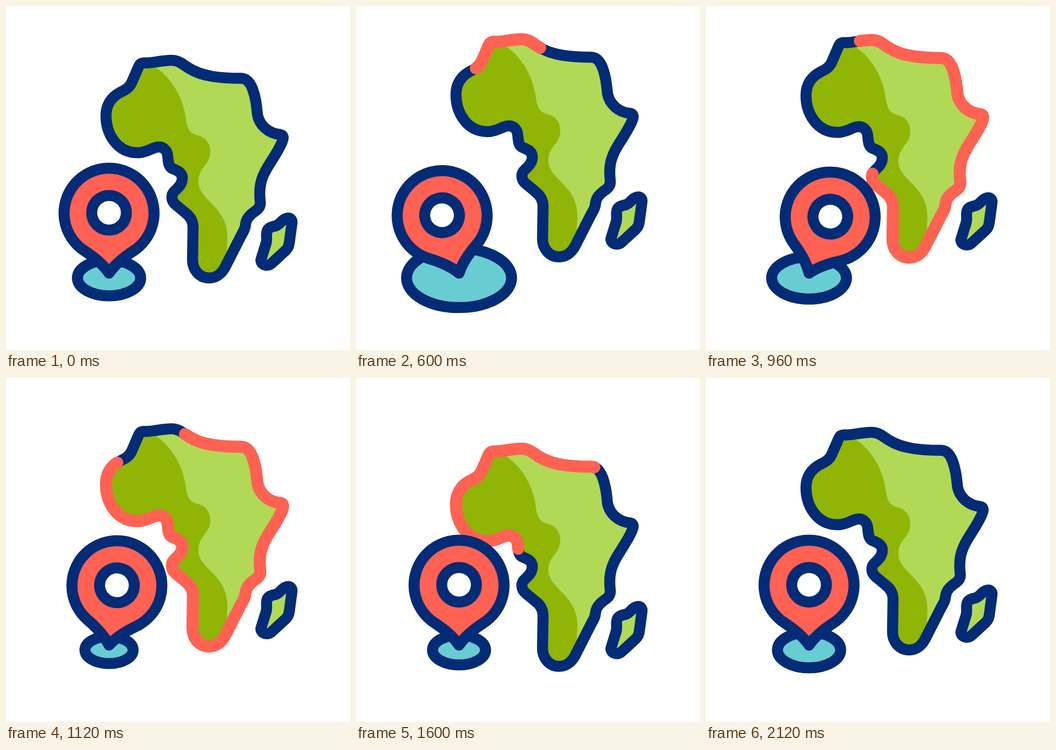
Write an HTML page that moves like this. It is 640 px wide and 640 px high and loops after 2.2 s.

```html
<!DOCTYPE html>
<html lang="en">
<head>
<meta charset="utf-8">
<title>Map pin beside a continent</title>
<style>
  html, body { margin: 0; width: 100%; height: 100%; overflow: hidden; background: #fff; }
  svg { display: block; width: 100%; height: 100%; }
  .line { stroke: #032b76; stroke-width: 20.5; stroke-linecap: round; stroke-linejoin: round; }
  .light { fill: #b1d955; }
  .dark { fill: #90b506; }
  .red { fill: #ff6252; }
  .trail { fill: none; stroke: #ff6252; stroke-width: 22.5; stroke-linecap: round; stroke-linejoin: round; }
</style>
</head>
<body>
<svg viewBox="0 0 640 640">
  <defs>
    <path id="coast" pathLength="1" d="M247.5 111
      C250 106 255 105.5 260 106 C275 106 290 101 308 101 C322 101 330 109.5 340 115.5
      C365 131.5 400 134.5 437 134.5 C448 134.5 454 142 459 155 C465 172 466 185 468 203
      C472 222 488 237 510 239 C516 240 517 245 514 252 C508 268 496 284 486 301
      C474 321 470 338 473 364 C474 372 470 377 466 380 C448 392 446 400 445 411
      C443 419 440 422 437 428 L407 487 C399 501 388 506 378 506
      C360 506 347 491 347 472 L348 412 C348 400 342 391 334 385 L316 370
      C306 362 307 350 314 344 C320 338 328 332 328 320 C328 310 319 306 311 303
      C302 300 302 290 301 280 C300 267 291 260 279 263 C268 266 260 273 245 273
      C205 273 186 236 186 204 C186 183 197 169 212 161 C222 156 229 153 234 142 Z"/>
    <clipPath id="land"><use href="#coast"/></clipPath>
  </defs>

  <g id="map">
    <use href="#coast" class="light"/>
    <path class="dark" clip-path="url(#land)" d="M268 108 C310 130 331 175 335 212
      C337 228 343 237 354 240 C370 243 380 254 380 271 C380 297 358 299 358 327
      C358 362 412 372 412 430 L408 510 H150 V90 H268 Z"/>
    <use href="#coast" class="line" fill="none"/>
    <use href="#coast" class="trail" id="trail"/>
    <path class="light line" d="M522 395 C529 393 533 398 532 404 L527 441
      C526 447 525 450 520 455 L495 478 C485 488 471 479 475 470 L484 441
      C486 434 484 428 485 422 C486 412 494 411 502 409 C511 406 513 397 522 395 Z"/>
  </g>

  <ellipse id="base" class="line" cx="191.7" cy="506" fill="#68cdd2"/>

  <g id="pin">
    <path class="red line" d="M191.7 497 C184.2 486 168.2 470 146.2 455.7
      A83.7 83.7 0 1 1 237.2 455.7 C215.2 470 199.2 486 191.7 497 Z"/>
    <circle class="line" cx="191.7" cy="384.7" r="32.3" fill="#fff"/>
  </g>
</svg>
<script>
  const LOOP = 2200, STEP = 40;
  const byId = id => document.getElementById(id);
  const map = byId('map'), trail = byId('trail'), base = byId('base'), pin = byId('pin');

  // Keys are [time, value] pairs, joined by a symmetric ease.
  const lift = [[200, 0], [790, -52], [800, -52], [1445, 40], [1935, 0]];
  const swing = [[205, 0], [552, -18.2], [920, 21.4], [1352, -9.8], [1760, 5.1], [2120, 0]];
  const spread = [[200, 1], [575, 1.66], [705, 1.66], [1245, 0.62], [1890, 1]];
  const head = [[394, 0], [1325, 1]];
  const tail = [[1075, 0], [2010, 1]];

  function at(keys, t) {
    if (t <= keys[0][0]) return keys[0][1];
    for (let i = 1; i < keys.length; i++) {
      const [t0, a] = keys[i - 1], [t1, b] = keys[i];
      if (t < t1) {
        const x = (t - t0) / (t1 - t0);
        return a + (b - a) * x * x * (3 - 2 * x);
      }
    }
    return keys[keys.length - 1][1];
  }

  function draw(t) {
    map.setAttribute('transform', `translate(0 ${at(lift, t)})`);
    pin.setAttribute('transform', `rotate(${at(swing, t)} 191.7 497)`);

    const k = at(spread, t);
    base.setAttribute('rx', 58.8 * k);
    base.setAttribute('ry', 33.2 * k);

    // The red trail runs clockwise while its origin drifts at a steady rate.
    const from = at(tail, t), length = at(head, t) - from;
    const drift = (t - 800) * 0.00021;
    trail.style.display = length > 0 ? '' : 'none';
    trail.style.strokeDasharray = `${length} ${1 - length}`;
    trail.style.strokeDashoffset = 2 - (from + drift);
  }

  function tick() {
    const t = (performance.now() + 4) % LOOP;
    draw(Math.floor(t / STEP) * STEP);
    requestAnimationFrame(tick);
  }
  tick();
</script>
</body>
</html>
```
